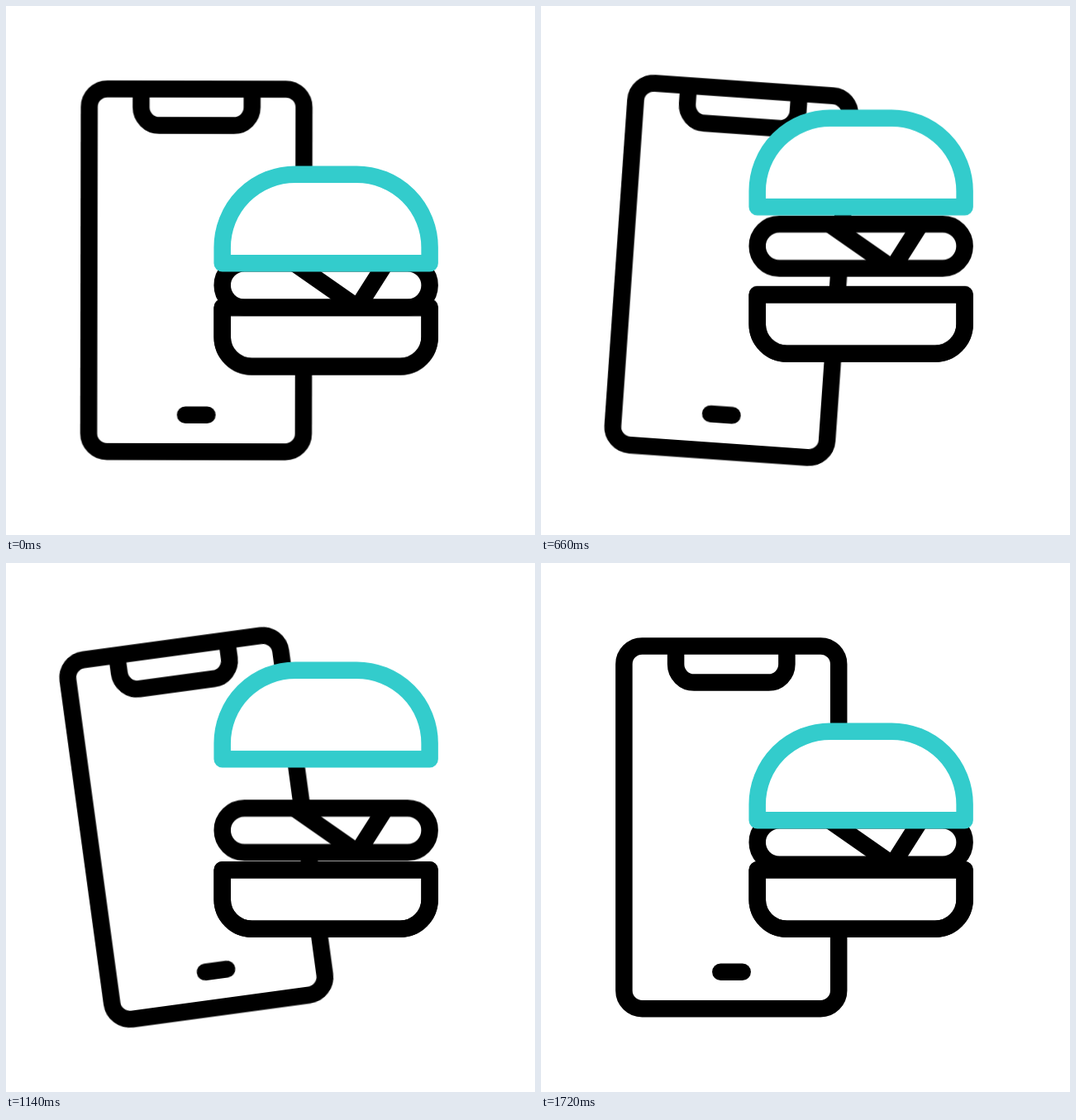
Recreate the animation shown at these times as an HTML page. Size 640 by 640 pixels, loop 2000 ms.

```html
<!DOCTYPE html>
<html lang="en">
<head>
<meta charset="utf-8">
<title>Food order</title>
<style>
  html, body { margin: 0; width: 100%; height: 100%; overflow: hidden; background: #fff; }
  svg { display: block; width: 100vw; height: 100vh; }
  .line { fill: none; stroke: #000; stroke-width: 20.5; stroke-linejoin: round; }
  .solid { fill: #fff; }
  .teal { stroke: #33cccc; }
  .phone, .bun, .patty, .top { animation: 2s linear infinite; }
  .phone { animation-name: swing; transform-origin: 230.3px 319.8px; }
  .bun { animation-name: bun; }
  .patty { animation-name: patty; }
  .top { animation-name: top; }

  /* decaying swing, then rest */
  @keyframes swing {
    0% { transform: rotate(0deg); animation-timing-function: cubic-bezier(.333, .94, .667, 1); }
    27% { transform: rotate(20deg); animation-timing-function: cubic-bezier(.333, 1, .667, 1); }
    54% { transform: rotate(-10deg); animation-timing-function: cubic-bezier(.35, .43, .65, 1); }
    81% { transform: rotate(5.5deg); animation-timing-function: ease-in-out; }
    86%, 100% { transform: rotate(0deg); }
  }
  /* the layers squeeze upwards, spring apart and settle in turn */
  @keyframes bun {
    0% { transform: translateY(-6.5px); animation-timing-function: cubic-bezier(.333, .524, .667, 1); }
    24% { transform: translateY(-27.2px); animation-timing-function: cubic-bezier(.364, 0, .636, 1); }
    56%, 100% { transform: translateY(0); }
  }
  @keyframes patty {
    0% { transform: translateY(0); animation-timing-function: cubic-bezier(.333, 0, .667, .333); }
    22% { transform: translateY(-22px); animation-timing-function: cubic-bezier(.333, .524, .667, 1); }
    38% { transform: translateY(-51px); animation-timing-function: cubic-bezier(.48, 0, .72, 1); }
    65%, 100% { transform: translateY(0); }
  }
  @keyframes top {
    0% { transform: translateY(0); animation-timing-function: cubic-bezier(.333, 0, .667, .333); }
    22% { transform: translateY(-8px); animation-timing-function: cubic-bezier(.28, 1, .62, 1); }
    50% { transform: translateY(-81.7px); animation-timing-function: cubic-bezier(.364, 0, .636, 1); }
    85.5%, 100% { transform: translateY(0); }
  }
</style>
</head>
<body>
<svg viewBox="0 0 640 640">
  <defs>
    <path id="base" d="M261.7 371.2H512.6V407a35.7 35.7 0 0 1-35.7 35.7H297.4A35.7 35.7 0 0 1 261.7 407Z"/>
  </defs>

  <g class="phone line">
    <rect x="100.4" y="100.4" width="259.8" height="438.9" rx="22"/>
    <path d="M163.1 100.4V122.6a22 22 0 0 0 22 22H275.4a22 22 0 0 0 22-22V100.4"/>
    <path d="M217.3 494.8H243.7" stroke-linecap="round"/>
  </g>

  <use class="bun line solid" href="#base"/>
  <g class="patty line">
    <rect class="solid" x="261.7" y="311.3" width="250.9" height="53.4" rx="26.7"/>
    <path d="M349 311.3L425.3 364.7L459.3 311.3"/>
  </g>
  <use class="bun line" href="#base"/>
  <path class="top line solid teal" d="M261.7 311.3V292A88.3 88.3 0 0 1 350 203.7H424.3A88.3 88.3 0 0 1 512.6 292V311.3Z"/>
</svg>
</body>
</html>
```
